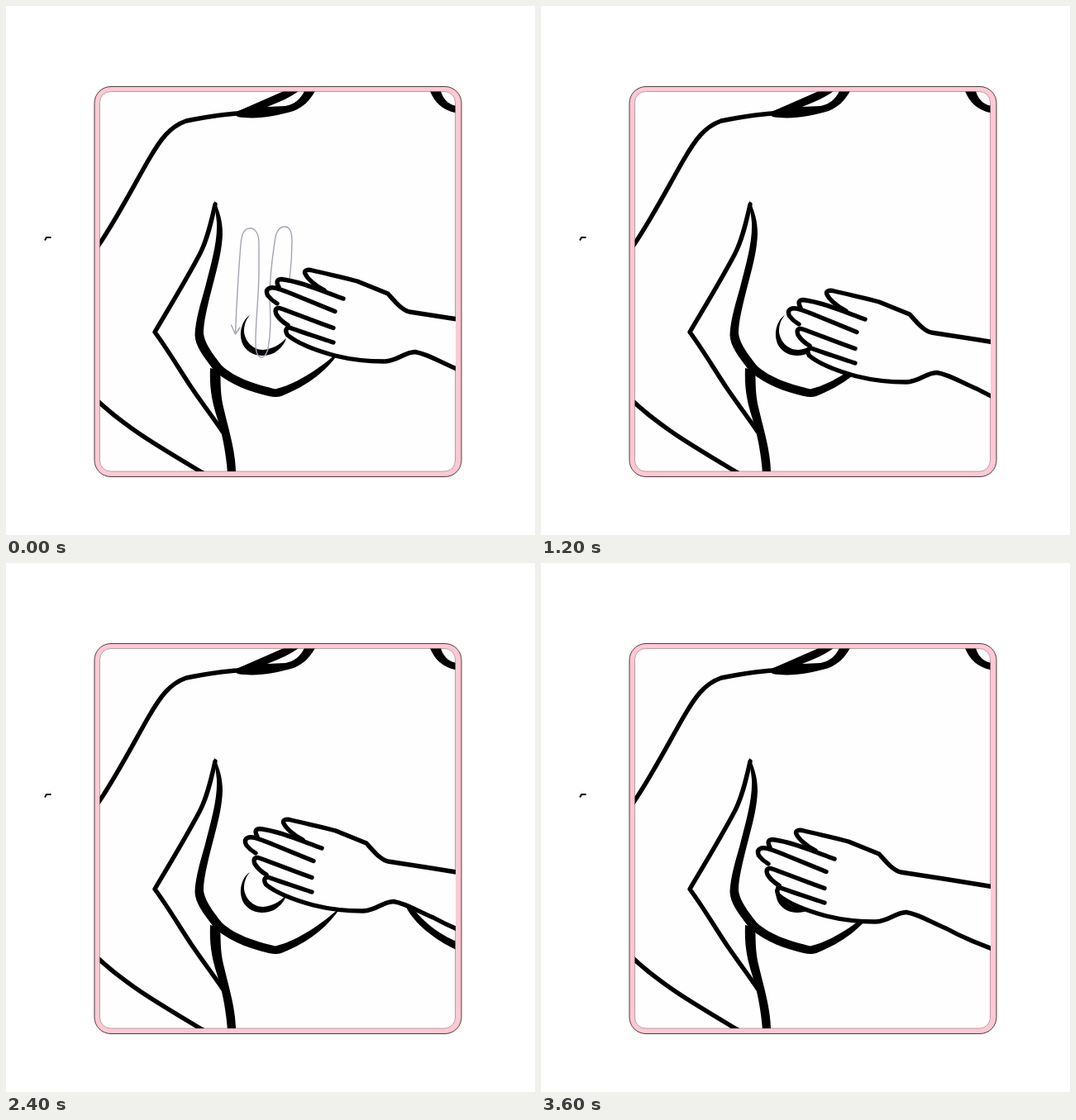
Animation, 640 px wide and 640 px high, one loop 4.2 s. Source, as an HTML page:

```html
<!DOCTYPE html>
<html lang="en">
<head>
<meta charset="utf-8">
<title>Self-exam</title>
<style>
  html, body { margin: 0; width: 100%; height: 100%; overflow: hidden; background: #fff; }
  svg { display: block; width: 100vw; height: 100vh; }
  .line { fill: none; stroke: #000; stroke-width: 5.4; stroke-linecap: round; stroke-linejoin: round; }
  .guide { fill: none; stroke: #a3a3b5; stroke-width: 1.4; stroke-linecap: round; stroke-linejoin: round; }
  .guide, .far, .hand { animation: 4.2s step-end infinite; }
  .guide { animation-name: guide; }
  .far { animation-name: far; }
  .hand { animation-name: sweep; }
  @keyframes guide {
    0% { visibility: visible; }
    14.285%, 100% { visibility: hidden; }
  }
  @keyframes far {
    0% { visibility: hidden; }
    57.142% { visibility: visible; }
    85.714%, 100% { visibility: hidden; }
  }
  @keyframes sweep {
    0% { transform: translate(0, 0); }
    28.571% { transform: translate(-16px, 25px); }
    42.857% { transform: translate(-26px, 25px); }
    57.142% { transform: translate(-26px, -9px); }
    71.428% { transform: translate(-46px, -14px); }
    85.714%, 100% { transform: translate(-53px, 4px); }
  }
</style>
</head>
<body>
<svg viewBox="0 0 640 640">
  <clipPath id="inner"><rect x="113.500" y="103.500" width="430" height="459.500" rx="13"/></clipPath>

  <!-- frame -->
  <rect x="107" y="97.500" width="444" height="472" rx="20" fill="#ffc8d4" stroke="#4a3e41"/>
  <rect x="113.500" y="103.500" width="430" height="459.500" rx="13" fill="#fefefe" stroke="#a88f95" stroke-width=".8"/>
  <path d="M47 283.500L49 280H54.500" fill="none" stroke="#000" stroke-width="2"/>

  <g clip-path="url(#inner)">
    <!-- shoulder, arm, belly -->
    <path class="line" d="M111 291C133 259 152 222 172 187C187 161 198 146 218 139C238 135 258 131 282 130"/>
    <path class="line" d="M253 240C248 263 243 284 234 301C217 333 198 364 180 394.500C198 419 211 442 226 464C239 483 252 500 262 515" stroke-linejoin="miter"/>
    <path class="line" d="M110 477C145 510 185 533 240 566"/>

    <!-- neck -->
    <path d="M276 129L288 124L336 103H374C367 115 360 122 348 127C326 133 303 138 280 134Z"/>
    <path d="M316 122C331 116 345 110 354 103H361C356 113 349 119 338 121Z" fill="#fefefe"/>
    <path d="M513 103C519 117 528 126 545 129.500V121C534 119 529 112 526 103Z"/>

    <!-- chest -->
    <path d="M252 235C258 247 262 260 262 276C261 300 254 322 248 346C243 366 239 383 239 396C240 407 249 420 261 435C278 451 304 458 326 463.500C348 458 375 443 405 416C390 440 366 459 333 472Q327 474 318 472C293 466 270 458 251 440C238 423 229 411 228.500 398C229 380 236 358 241 340C248 312 256 286 255 262Z"/>
    <path d="M247 438L259 441C260 452 259 464 262 481C268 508 278 538 278 565H268C266 540 262 520 256 500C249 478 246 462 247 438Z"/>
    <path d="M295 374C283 382 281 401 288 412C296 423 310 426 324 420C331 416 337 409 339 402C331 410 322 415 311 416C298 416 289 405 288 394C288 386 290 380 295 374Z"/>
    <path class="far" d="M482 412C491 434 518 456 545 468V458C522 448 504 434 490 414Z"/>

    <!-- stroke direction -->
    <path class="guide" d="M343 331C345 315 346 301 346 284C346 272 343 267 337 267C329 267 326 276 325 286C321 312 319 332 319 354C320 374 321 392 317 415C315 422 313 425 309 425C304 425 302 417 302 407C302 380 306 350 306 320V288C306 276 302 269 295 269C287 269 285 278 284 288C281 325 279 360 277.500 397M272.500 386L277.500 397L283 389"/>

    <g class="hand">
      <path fill="#fefefe" d="M408 354L383 343C373 337 364 329 361 322Q362 318 368 319C391 325 408 328 425 333L462 348C470 357 478 367 488 370L543 379L620 391V472L543 438C524 430 510 421 495 418C481 419 475 429 458 430C438 430 418 428 398 423C376 417 355 410 340 399Q335 392 341 388L338 385C330 379 322 370 327 364.500C319 359 312 350 315 343Q320 339 330 341Q324 331 333 330C352 333 368 338 383 343Z"/>
      <path class="line" d="M385 344C373 338 364 329 361.500 323Q361 318.500 369 319.500C391 325 408 328 425 333L462 348C470 357 478 367 488 370L543 378.500L620 391"/>
      <path class="line" d="M408 354C383 345 355 333 333 330.500Q325 331 330 340"/>
      <path class="line" d="M398 369.500C374 360 349 349 332 343C319 338 313 342 316.500 350Q321 356 328 360"/>
      <path class="line" d="M396 389.500C374 382 350 372 331 365.500Q324 365 327 373Q332 381 341 386"/>
      <path class="line" d="M396 407C378 401 359 395 343 389Q336 390 340.500 398C355 410 376 417 398 423C418 428 438 430 458 430C475 429 481 419 495 418.500C510 421 524 430 543 438C561 448 578 455 620 471"/>
    </g>
  </g>
</svg>
</body>
</html>
```
